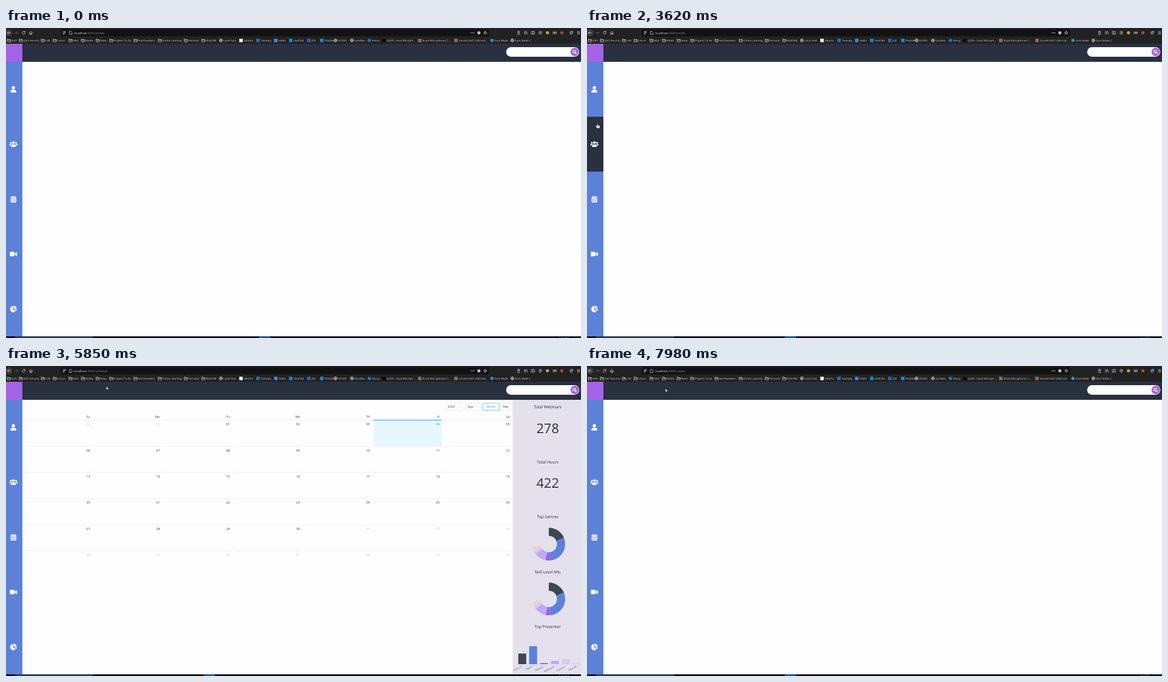
Write an HTML page that moves like this. It is 1018 by 550 pixels and loops after 8000 ms.

```html
<!DOCTYPE html>
<html lang="en">
<head>
<meta charset="utf-8">
<title>Webinar dashboard</title>
<style>
html, body { margin: 0; width: 100%; height: 100%; overflow: hidden; background: #fefefe; }
svg { display: block; width: 100vw; height: 100vh; }
text { font-family: "Open Sans", "Noto Sans", sans-serif; text-rendering: geometricPrecision; white-space: pre; }
.line { fill: none; stroke: #cfcfcf; stroke-width: .8; stroke-linecap: round; stroke-linejoin: round; }
</style>
</head>
<body>
<svg id="stage" viewBox="0 0 1018 550" preserveAspectRatio="none"></svg>
<script>
const LOOP = 8000;
const NAVY = '#29303f', BLUE = '#5c81d9', PURPLE = '#a463e6', LINK = '#1890ff';
const CHART = ['#3d4752', BLUE, '#a160e2', '#bca9f8', '#d6c9f2', '#e7d6cc'];

// drawing helpers
const rect = (x, y, w, h, fill, more = '') => `<rect x="${x}" y="${y}" width="${w}" height="${h}" fill="${fill}" ${more}/>`;
const disc = (x, y, r, fill, more = '') => `<circle cx="${x}" cy="${y}" r="${r}" fill="${fill}" ${more}/>`;
const text = (x, y, size, str, fill, more = '') => `<text x="${x}" y="${y}" font-size="${size}" fill="${fill}" ${more}>${str}</text>`;
const line = (d, more = '') => `<path class="line" d="${d}" ${more}/>`;
const shape = (d, fill = '#fff', more = '') => `<path d="${d}" fill="${fill}" ${more}/>`;
const group = (id, body, more = '') => `<g id="${id}" ${more}>${body}</g>`;
const MID = 'text-anchor="middle"', END = 'text-anchor="end"';

// bookmarks: icon x, kind or colour, label
const marks = [
  [2, 'dir', 'QVD'], [23, 'dir', 'QVD Security'], [62, 'dir', 'LAB'], [83, 'dir', 'Linux+'],
  [111, 'dir', 'Mail'], [133, 'dir', 'Media'], [159, 'dir', 'News'], [183, 'dir', 'Projects To Do'],
  [226, 'dir', 'Northwestern'], [269, 'dir', 'Online Learning'], [315, 'dir', 'Personal'],
  [346, 'dir', 'README'], [377, 'web', 'Local Host'], [413, '#f2f2f2', 'Veluma'],
  [443, '#1673b8', 'Tavonply'], [474.5, '#3d86dd', 'Hedlo'], [501, '#1482d8', 'VastFold'],
  [533, '#2461c4', 'JQX'], [556, '#1b83cf', 'Plombo'], [580, 'web', 'DOVEK'], [609, 'web', 'Sandbox'],
  [640, '#1878c6', 'Morvy'], [666, '#0c0c0c', 'QLDR - Vocal Microph...'],
  [729.5, '#8f6a58', 'Brask Microphones C...'], [793.5, '#8f6a58', 'Sonvelt kX47 USB Aud...'],
  [857, '#2f8fb5', 'Dark Mode'], [893, 'web', 'Dark Mode 2']
];

function bookmark([x, kind, label]) {
  let icon;
  if (kind === 'dir') icon = line(`M${x + .4} 24.2V19.6h2l.8 1h3v3.6zM${x + .4} 21.7h5.8`, 'stroke-width=".6"');
  else if (kind === 'web') icon = disc(x + 3.4, 22, 2.9, 'none', 'stroke="#c4c4c4" stroke-width=".7"') +
    line(`M${x + .6} 22h5.6M${x + 3.4} 19.2q-2.6 2.8 0 5.6q2.6-2.8 0-5.6`, 'stroke-width=".5"');
  else icon = x > 850 || x === 640 ? disc(x + 3.3, 22, 3, kind) : rect(x, 19, 6.2, 6.2, kind);
  return icon + text(x + 8, 23.8, 4.6, label, '#d0d0d0');
}

function star(x, y, r) {
  let d = '';
  for (let i = 0; i < 10; i++) {
    const a = i * Math.PI / 5, q = i % 2 ? r * .45 : r;
    d += `${i ? 'L' : 'M'}${x + q * Math.sin(a)} ${y - q * Math.cos(a)}`;
  }
  return line(d + 'z', 'stroke-width=".7"');
}

function browser() {
  return rect(0, 0, 1018, 28, '#222') + rect(97, 2.3, 758, 12.4, '#121212', 'rx="1"') +
    disc(5.2, 8.5, 5.6, '#3b3b3b', 'stroke="#555" stroke-width=".5"') +
    line('M8 8.5H2.6m2.4-2.4L2.6 8.5 5 10.9') +
    line('M15.5 8.5h5.4m-2.4-2.4 2.4 2.4-2.4 2.4', 'style="stroke:#666"') +
    line('M33.3 7.1a2.6 2.6 0 1 0 .3 2.2M33.8 5.4v2h-2') +
    line('M41.2 8.7 44 5.9l2.8 2.8M42 8.4v2.9h1.4V9.4h1.2v1.9H46V8.4') +
    line('M101 6.2h4.6M101 8.4h3.6M101 10.6h2.2M105.3 6.4l-3.8 4.8') +
    line('M112.6 6h2.6l1.6 1.6v3.8h-4.2z', 'stroke-width=".6"') +
    '<text x="121" y="10.6" font-size="5.23" fill="#8b8b8b"><tspan fill="#e2e2e2">localhost</tspan>:3000/<tspan id="path"></tspan></text>' +
    [823.5, 826, 828.5].map(x => disc(x, 8.6, .8, '#ccc')).join('') +
    disc(837.2, 8.6, 2.8, '#bdbdbd') + star(848.5, 8.6, 3) +
    star(907.5, 7.6, 2.4) + line('M905 11.4h5') +
    line('M918 6v5M920 6v5M921.6 6l1.8 5') +
    line('M930.4 6.2h5.4v4.6h-5.4zM932.6 6.2v4.6') +
    disc(946, 8.5, 2.6, 'none', 'stroke="#cfcfcf" stroke-width=".8"') + disc(946, 8, 1, '#cfcfcf') +
    disc(958.7, 8.5, 2.8, '#c9a14a') +
    line('M969 6.2v4.6M971.5 6.2v4.6M974 6.2v4.6M968.8 8.5h5.4', 'stroke-width="1.2"') +
    disc(984.2, 8.5, 2.8, '#b0452f') + star(1000.6, 8.8, 3) + disc(1003, 6.4, 1.4, '#2c9be8') +
    line('M1011.4 6.4h4.4M1011.4 8.5h4.4M1011.4 10.6h4.4') +
    marks.map(bookmark).join('');
}

const ICONS = [
  disc(13, 106, 2.9, '#fff') + shape('M8 114.6v-1.4q0-3.4 3.4-3.6 1.6.8 3.2 0 3.4.2 3.4 3.6v1.4z'),
  disc(13.2, 203.4, 2.4, '#fff') + disc(8.6, 203.4, 1.5, '#fff') + disc(17.9, 203.4, 1.5, '#fff') +
    shape('M9 211v-1.6q0-2.8 2.8-2.9 1.4.6 2.8 0 2.8.1 2.8 2.9V211zM6.2 208.4V207q0-1.6 1.6-1.6h1.5q.8 0 1 .5-2 .9-2.2 2.5zM20.3 208.4V207q0-1.6-1.6-1.6h-1.5q-.8 0-1 .5 2 .9 2.2 2.5z'),
  shape('M8.2 301.6v-1q0-1.2 1.2-1.2h1v-1.5h1.5v1.5h2.6v-1.5H16v1.5h1q1.2 0 1.2 1.2v1zM8.2 302.3h10v6q0 1.2-1.2 1.2H9.4q-1.2 0-1.2-1.2z') +
    [0, 1, 2].map(i => [0, 1].map(j => rect(9.6 + i * 2.7, 303.6 + j * 2.7, 1.6, 1.6, NAVY, 'class="hole"')).join('')).join(''),
  rect(6.8, 397.1, 8.2, 8, '#fff', 'rx="1.2"') + shape('M15.6 399.7 19.4 397.4V404.9L15.6 402.6z'),
  shape('M12.4 493v6l4.2 4.1A5.7 5.7 0 1 1 12.4 493z') +
    shape('M13.6 492.6a5.4 5.4 0 0 1 5.2 5.3h-5.2zM14.2 499h5a5.6 5.6 0 0 1-1.6 3.5z')
];
const ITEM = 97.4;

function frame() {
  return rect(0, 28, 1018, 32, NAVY) + rect(0, 28, 29, 32, PURPLE) +
    rect(885.5, 34, 129.5, 17, '#fff', 'rx="8.5"') + disc(1006.9, 42.5, 7.4, PURPLE) +
    '<circle cx="1006.1" cy="41.8" r="2.3" fill="none" stroke="#fff" stroke-width="1.2"/>' +
    '<path d="M1008 43.7l2 2" stroke="#fff" stroke-width="1.5" stroke-linecap="round"/>' +
    rect(0, 60, 29, 487, BLUE) + rect(0, 60, 29, ITEM, NAVY, 'id="hover"') + ICONS.join('') +
    rect(0, 547, 1018, 3, '#0b0f1a') + rect(16, 547.4, 138, 2.6, '#34414f') +
    rect(0, 547.4, 20, 2.6, '#1f5fa6', 'id="task"') +
    text(979, 552.4, 4.6, '3:48 PM', '#b8b8b8');
}

function webinars() {
  const entry = (x, y, name) => disc(x - 4, y, 1.2, '#222') +
    text(x, y + 12, 5.25, 'Webinar Image', LINK) + text(x, y + 26.5, 5.25, name, '#262626');
  return text(438, 92.3, 5.25, 'Upcoming Webinars!', '#262626') +
    entry(408, 121.7, 'Learn JavaScript!') + entry(449, 121.7, 'Learn Python!') +
    entry(408, 167, 'Learn Ruby!') + entry(445, 167, 'Learn React') + entry(482, 167, 'Learn CSS');
}

function calendar() {
  const box = (x, w, stroke) => rect(x, 66, w, 12.4, '#fff', `rx="1" stroke="${stroke}" stroke-width=".6"`);
  const chevron = x => line(`M${x - 1.6} 71.4l1.6 1.6 1.6-1.6`, 'style="stroke:#bbb;stroke-width:.6"');
  let out = box(777.8, 31, '#d9d9d9') + text(782, 74.4, 5.5, '2020', '#333') + chevron(802.6) +
    box(812.6, 28, '#d9d9d9') + text(817.3, 74.4, 5.5, 'Sep', '#333') + chevron(834) +
    box(873, 26, '#d9d9d9') + text(884.8, 74.4, 5.4, 'Year', '#333', MID) +
    box(844.2, 29, LINK) + text(858.7, 74.4, 5.4, 'Month', LINK, MID);
  ['Su', 'Mo', 'Tu', 'We', 'Th', 'Fr', 'Sa'].forEach((name, col) => {
    const x = 31 + col * 123.85, right = x + 117.6;
    out += text(right, 92.4, 5.4, name, '#333', END);
    for (let row = 0; row < 6; row++) {
      const y = 96 + row * 46.4, n = row * 7 + col - 1, today = n === 4;
      const day = n < 1 ? n + 31 : n > 30 ? n - 30 : n;
      if (today) out += rect(x, y, 121.4, 46.4, '#e6f7ff');
      out += rect(x, y - .5, 121.4, 1, today ? LINK : '#eeeeee');
      out += text(right, y + 9.2, 5.6, String(day).padStart(2, '0'), today ? LINK : n < 1 || n > 30 ? '#cbcbcb' : '#333', END);
    }
  });
  return out;
}

const CUTS = [0, 93, 241, 265, 323, 338, 360];
const BARS = [26, 44, 2.7, 8, 13, 2];
const barX = i => 907 + i * 19.3;

function stats() {
  const titles = ['Total Webinars', 'Total Hours', 'Top Genres', 'Skill Level Mix', 'Top Presenter'];
  const people = ['Corin V.', 'Neil F.', 'Perla K.', 'Wendy H.', 'Lenny S.', 'Tess W.'];
  const donut = y => CHART.map(c =>
    `<circle class="slice" cx="961" cy="${y}" r="21.75" fill="none" stroke="${c}" stroke-width="14.5" pathLength="360" transform="rotate(-90 961 ${y})"/>`).join('');
  return rect(897, 60, 121, 487, '#e4e0ec') +
    titles.map((s, i) => text(959, 75.4 + i * ITEM, 7.2, s, '#2b3240', MID)).join('') +
    text(959, 118.6, 23.4, '278', '#2b3240', MID) + text(959, 216, 23.4, '422', '#2b3240', MID) +
    donut(316) + donut(413.3) +
    CHART.map((c, i) => rect(barX(i), 529, 14, 0, c, 'class="bar"')).join('') +
    people.map((s, i) => text(0, 0, 4.8, s, '#666', `${END} transform="translate(${barX(i) + 7.5} 534) rotate(-27)"`)).join('');
}

const outline = 'stroke="#111" stroke-width=".6" stroke-linejoin="round"';
const cursors =
  group('arrow', shape('M0 0V6.4L1.5 5.1 2.5 7.3 3.5 6.9 2.5 4.7H4.5z', '#fff', outline)) +
  group('hand', shape('M-.7.5Q0-.4.7.5V3.2L3.6 3.9Q4.5 4.2 4.4 5.2L3.8 8.9H-.6L-3 5.8Q-3-.0-.7 5.6z', '#fff', outline)) +
  group('beam', '<path d="M-1.6-3.8H1.6M0-3.8V3.8M-1.6 3.8H1.6" stroke="#e8e8e8" stroke-width=".8" fill="none"/>');

document.getElementById('stage').innerHTML =
  rect(0, 0, 1018, 550, '#fefefe') +
  group('webinars', webinars()) + group('schedule', calendar() + stats()) +
  frame() + browser() +
  group('status', rect(-2, 539, 48, 8, '#1c1c1c', 'stroke="#444" stroke-width=".4"') +
    '<text x="-2" y="544.9" font-size="4.6" fill="#e0e0e0">localhost:3000/<tspan id="target"></tspan></text>') +
  group('cursor', cursors);

const $ = id => document.getElementById(id);
const slices = [...document.querySelectorAll('.slice')];
const bars = [...document.querySelectorAll('.bar')];
const holes = [...document.querySelectorAll('.hole')];
const show = (id, on) => { $(id).style.display = on ? '' : 'none'; };

// bursts of updates: first, last, count
const bursts = [[300, 1020, 10], [1180, 1260, 2], [1410, 1730, 5], [1890, 2290, 6], [2520, 3310, 11],
  [3390, 3390, 1], [3540, 4330, 11], [4410, 5210, 11], [5290, 6090, 11], [6170, 6880, 10], [7030, 7820, 11], [7900, 7980, 2]];
const ticks = [0];
for (const [from, to, n] of bursts)
  for (let i = 0; i < n; i++) ticks.push(Math.round((from + (n > 1 ? (to - from) * i / (n - 1) : 0)) / 10) * 10);

// pointer: time, x, y
const way = [
  [300, 862, 443], [540, 480, 180], [780, 137, 22], [1020, 180, 7], [1260, 181, 7], [1410, 178, 9], [1730, 162, 13],
  [1890, 140, 28], [2130, 20, 104], [2290, 3, 113.8], [2520, 4, 114], [2840, 14, 112], [3150, 120, 35], [3310, 172, 6],
  [3390, 171, 6], [3540, 75, 85], [3620, 18.5, 169.2], [4090, 22, 188], [4330, 150, 30], [4410, 186, 8], [4970, 187, 6],
  [5210, 22, 215], [5290, 20, 280], [5530, 27.3, 302.2], [5610, 45, 262], [5850, 177.7, 36], [5930, 176, 11], [6170, 170, 11],
  [6330, 32, 150], [6410, 20, 200], [6490, 24, 206], [6570, 49.3, 186], [6810, 165, 14], [6880, 168, 10],
  [7030, 120, 90], [7190, 20, 390], [7430, 22, 396], [7660, 140, 90], [7820, 168, 11], [7900, 160, 22], [7980, 138.8, 40]
];

function pointer(t) {
  let i = 0;
  while (i < way.length - 2 && way[i + 1][0] <= t) i++;
  const [t0, x0, y0] = way[i], [t1, x1, y1] = way[i + 1];
  const k = Math.min(1, (t - t0) / (t1 - t0));
  return [x0 + (x1 - x0) * k, y0 + (y1 - y0) * k];
}

function draw(now) {
  const t = ticks.filter(v => v <= now).pop();
  const [x, y] = pointer(t);
  const within = (a, b) => t >= a && t < b;

  $('path').textContent = t < 4010 ? 'profile' : t < 5450 ? 'community' : t < 7350 ? 'schedule' : 'create';
  show('webinars', within(4010, 5610));
  show('schedule', within(5610, 7350));
  $('task').setAttribute('x', t < 2840 ? 448 : 350);

  show('status', within(2290, 2920) || within(3780, 4170));
  $('target').textContent = t < 3000 ? 'profile' : 'community';

  const over = t >= 300 && x < 29 && y > 60 ? Math.floor((y - 60) / ITEM) : -1;
  show('hover', over >= 0);
  if (over >= 0) $('hover').setAttribute('y', 60 + over * ITEM);
  holes.forEach(h => h.setAttribute('fill', over === 2 ? NAVY : BLUE));

  const u = Math.max(0, Math.min(1, (t - 5610) / 570));
  const grow = 1 - Math.pow(1 - u, 2.35);
  slices.forEach((s, n) => {
    const i = n % 6, from = CUTS[i] * grow, len = (CUTS[i + 1] - CUTS[i]) * grow;
    s.setAttribute('stroke-dasharray', `${len} ${720 - len}`);
    s.setAttribute('stroke-dashoffset', -from);
    s.style.display = grow ? '' : 'none';
  });
  bars.forEach((b, i) => {
    b.setAttribute('y', 529 - BARS[i] * grow);
    b.setAttribute('height', BARS[i] * grow);
  });

  const kind = y < 17 && x > 97 && x < 855 ? 'beam' : x < 50 && y > 60 ? 'hand' : 'arrow';
  ['arrow', 'hand', 'beam'].forEach(k => show(k, k === kind));
  show('cursor', t >= 300);
  $('cursor').setAttribute('transform', `translate(${x} ${y})`);
}

const start = performance.now();
function loop() {
  draw((performance.now() - start) % LOOP);
  requestAnimationFrame(loop);
}
loop();
</script>
</body>
</html>
```
